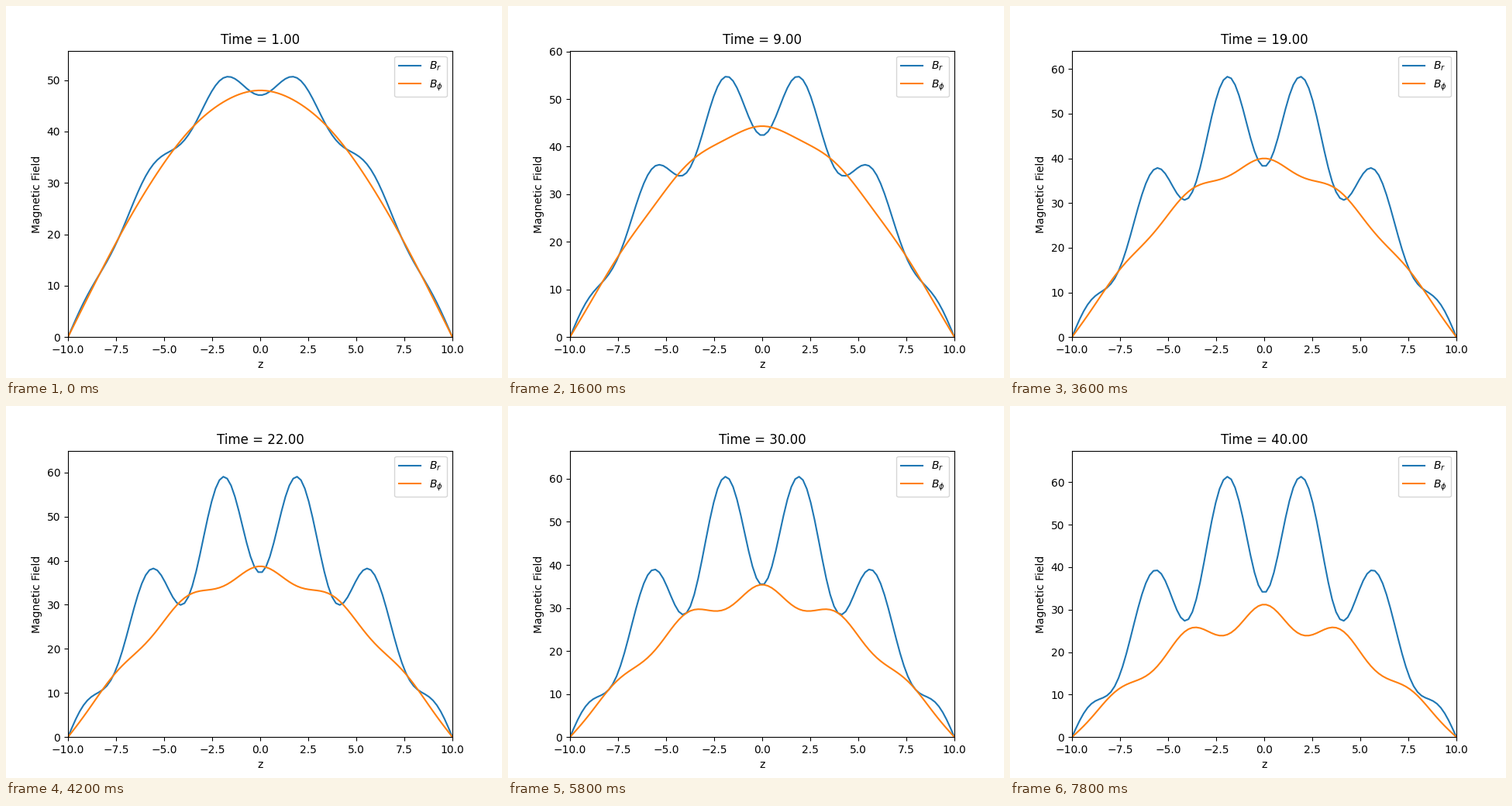
A matplotlib script for the animation above (8000 ms loop, 640 by 480 pixels).

```python
import numpy as np
import matplotlib.pyplot as plt
from matplotlib.animation import FuncAnimation

# Mean-field dynamo: alpha effect feeds B_r, shear drains B_phi, both diffuse.
ALPHA, ETA, SHEAR = 0.01, 0.01, 0.01
B0 = 50.0
FRAMES, INTERVAL = 40, 200
LEAD = 4                # time units evolved before the first picture
SUBSTEPS = 10

z = np.linspace(-10, 10, 100)
dz = z[1] - z[0]
alpha = ALPHA * np.sin(np.pi * z / 2)


def laplacian(f):
    out = np.zeros_like(f)
    out[1:-1] = (f[2:] - 2 * f[1:-1] + f[:-2]) / dz**2
    return out


def rate(state):
    br, bphi = state
    d = np.array([
        -np.gradient(alpha * bphi, dz) + ETA * laplacian(br),
        -SHEAR * br + ETA * laplacian(bphi),
    ])
    d[:, [0, -1]] = 0
    return d


def advance(state, units=1):
    dt = 1 / SUBSTEPS
    for _ in range(units * SUBSTEPS):
        k1 = rate(state)
        k2 = rate(state + dt / 2 * k1)
        k3 = rate(state + dt / 2 * k2)
        k4 = rate(state + dt * k3)
        state = state + dt / 6 * (k1 + 2 * k2 + 2 * k3 + k4)
    return state


def solve():
    seed = B0 * np.cos(np.pi * z / 20)
    seed[[0, -1]] = 0
    states = [advance(np.array([seed, seed]), LEAD)]
    while len(states) < FRAMES:
        states.append(advance(states[-1]))
    return states


history = solve()

fig, ax = plt.subplots(figsize=(6.4, 4.8), dpi=100)
line_r, = ax.plot(z, history[0][0], label=r"$B_r$")
line_phi, = ax.plot(z, history[0][1], label=r"$B_\phi$")
ax.set_xlim(-10, 10)
ax.set_xlabel("z")
ax.set_ylabel("Magnetic Field")
ax.legend(loc="upper right")
title = ax.set_title("")


def update(i):
    br, bphi = history[i]
    line_r.set_ydata(br)
    line_phi.set_ydata(bphi)
    ax.set_ylim(0, 1.1 * max(br.max(), bphi.max()))
    title.set_text(f"Time = {i + 1:.2f}")
    return line_r, line_phi, title


anim = FuncAnimation(fig, update, frames=FRAMES, interval=INTERVAL,
                     init_func=lambda: update(0), repeat=True,
                     repeat_delay=0, blit=False)
plt.show()
```
